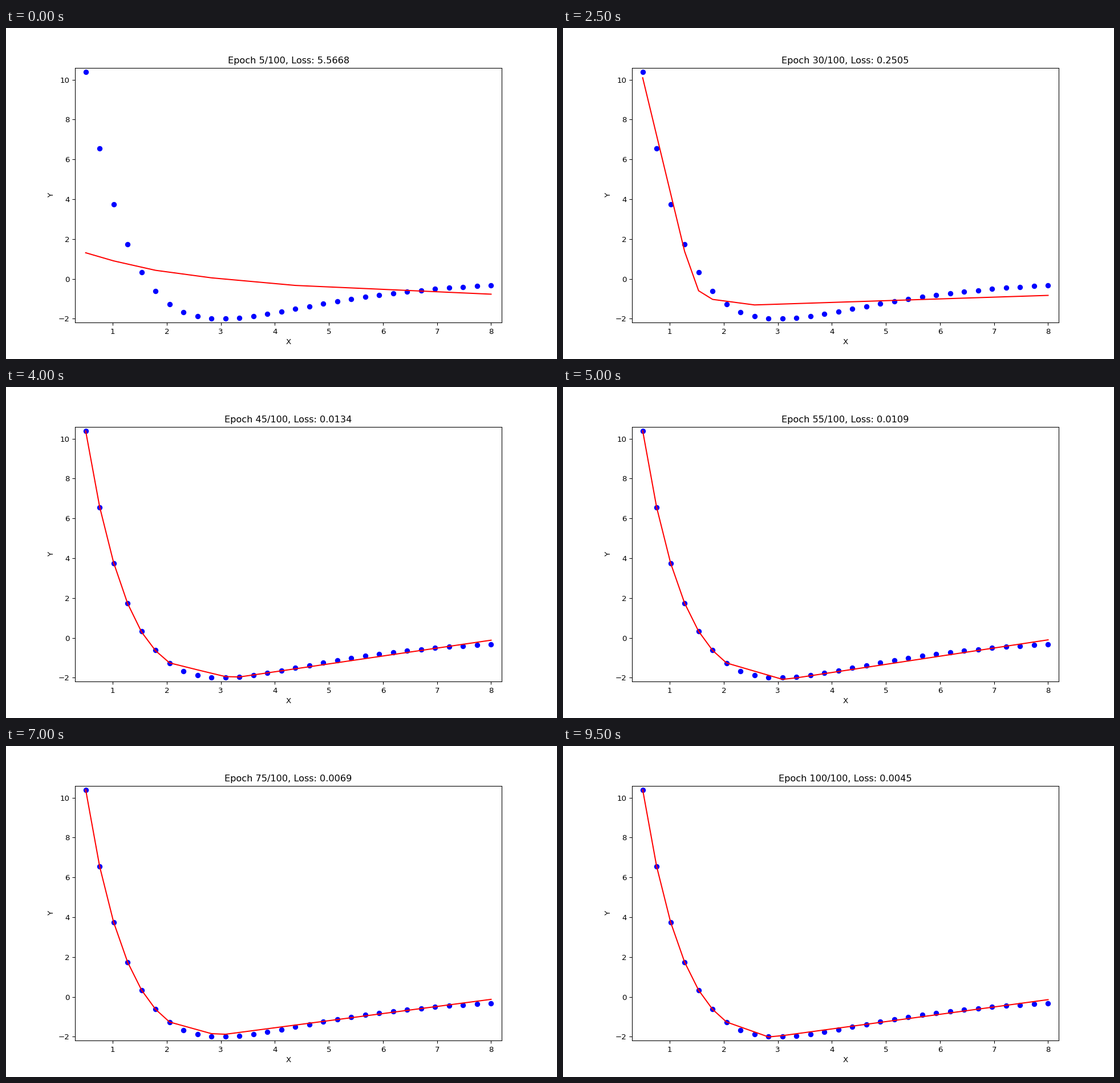
Animation, 966 px wide and 580 px high, one loop 10 s. Source, as a matplotlib script:

```python
import numpy as np
import matplotlib.pyplot as plt
from matplotlib.animation import FuncAnimation

plt.rcParams["font.family"] = "DejaVu Sans"

DPI = 96.6
EPOCHS, STEP = 100, 5
X = np.linspace(0.5, 8, 30)

# Joints (x, y) of the rough fit at three early stages
STAGES = {
    5: [(.5, 1.31), (1.02, .9), (1.79, .43), (2.83, .05), (4.38, -.33), (8, -.77)],
    20: [(.5, 7.61), (1.28, 2.81), (1.53, 1.21), (1.79, 0), (2.1, -.47), (8, -1.25)],
    30: [(.5, 10.1), (1.28, 1.33), (1.53, -.59), (1.79, -1.03), (2.57, -1.31), (8, -.83)],
}
LOSSES = {5: 5.5668, 20: 1.0983, 30: 0.2505, 45: 0.0134,
          65: 0.0089, 85: 0.0054, 100: 0.0045}


def morse(x):
    return 2 * ((1 - np.exp(-0.5 * (x - 3))) ** 2 - 1)


def progress(epoch, start, end):
    return np.clip((epoch - start) / (end - start), 0, 1)


def rough_fit(epoch):
    """Bent line whose joints travel; its far end overshoots at first."""
    paths = np.array(list(STAGES.values())).reshape(len(STAGES), -1).T
    joints = np.array([np.interp(epoch, list(STAGES), path) for path in paths])
    t = progress(epoch, 5, 20)
    overshoot = 5.5 * t * (1 - t) ** 2 * (X / 8) ** 2
    return np.interp(X, joints[::2], joints[1::2]) - overshoot


def settled_fit(epoch):
    """Follows the data down, then a straight tail; the valley swings and settles."""
    t = progress(epoch, 45, 85)
    age = epoch - 53
    valley = -2 - 0.12 * np.cos(2 * np.pi * age / 44) * np.exp(-age / 40)
    xs = [*X[:7], 3.2 - 0.35 * t, 8]
    ys = [*morse(X[:7]), valley, -0.08 - 0.06 * t]
    return np.interp(X, xs, ys)


def predict(epoch):
    rough = np.exp(-max(epoch - 30, 0) / 5)
    return rough * rough_fit(epoch) + (1 - rough) * settled_fit(epoch)


def loss(epoch):
    return np.exp(np.interp(epoch, list(LOSSES), np.log(list(LOSSES.values()))))


fig, ax = plt.subplots(figsize=(966 / DPI, 580 / DPI), dpi=DPI)
Y = morse(X)
ax.plot(X, Y, "bo")
line, = ax.plot(X, predict(STEP), "r-")
ax.set_xlim(X.min() - 0.2, X.max() + 0.2)
ax.set_ylim(Y.min() - 0.2, Y.max() + 0.2)
ax.set_xlabel("X")
ax.set_ylabel("Y")
title = ax.set_title("")


def update(frame):
    epoch = (frame + 1) * STEP
    line.set_ydata(predict(epoch))
    title.set_text(f"Epoch {epoch}/{EPOCHS}, Loss: {loss(epoch):.4f}")
    return line, title


anim = FuncAnimation(fig, update, frames=EPOCHS // STEP, interval=500,
                     repeat=True, repeat_delay=0)
plt.show()
```
